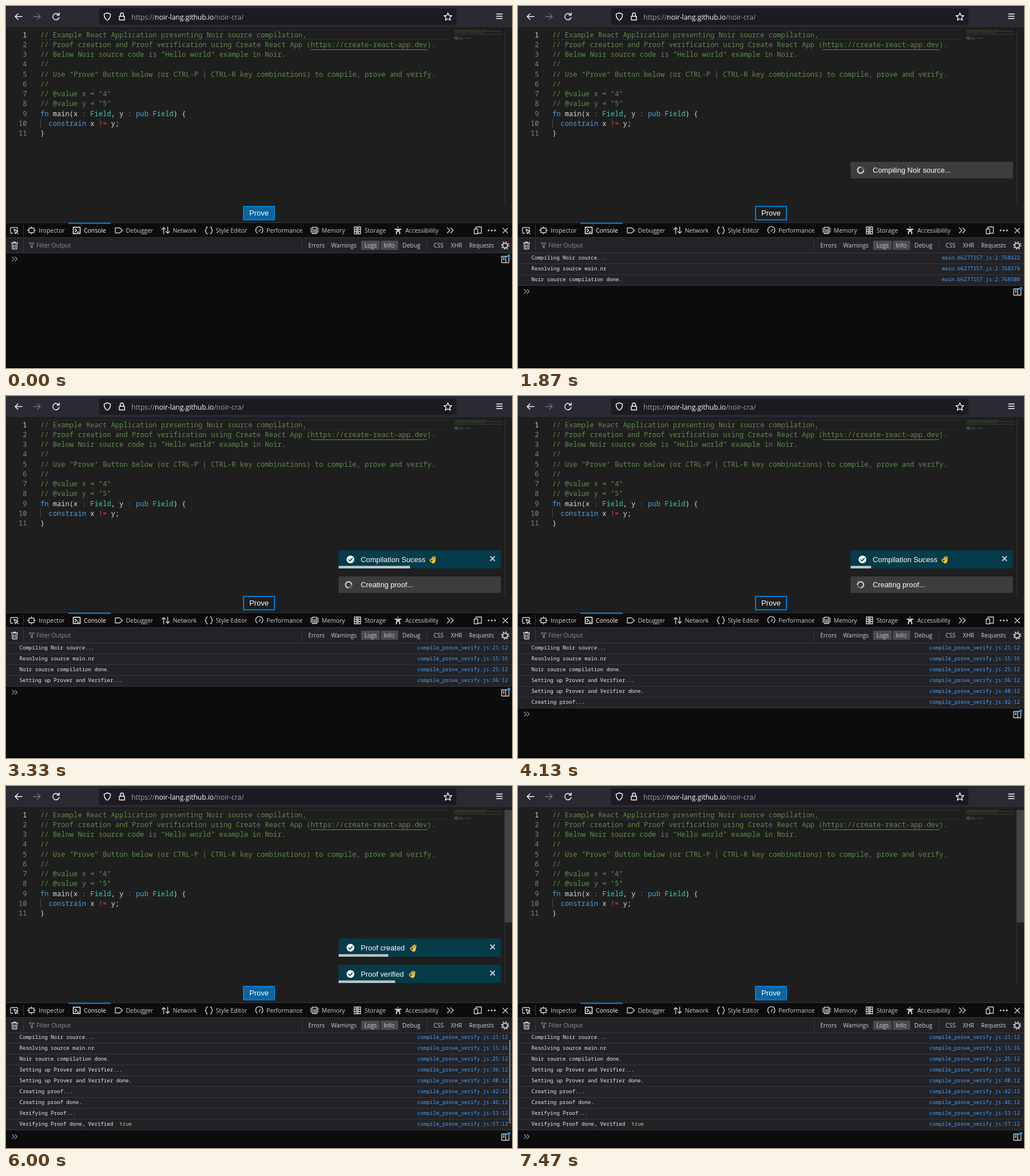
An HTML page for the animation above (8 s loop, 884 px wide and 634 px high).

```html
<!DOCTYPE html>
<html lang="en">
<head>
<meta charset="utf-8">
<title>Noir proof demo</title>
<style>
  html, body { margin: 0; width: 100%; height: 100%; overflow: hidden; background: #0c0c0d; }
  svg { position: absolute; left: 0; top: 0; display: block; overflow: visible; }
  text { white-space: pre; }
  .ui { font: 10.4px "Open Sans", sans-serif; fill: #d7d7db; }
  .mono { font-family: "Noto Sans Mono", monospace; font-weight: 500; }
  .log { font-size: 9.1px; fill: #ececee; }
  .arial { font: 13px "Liberation Sans", Arial, sans-serif; fill: #fff; }
  .line { fill: none; stroke: #d0d0d4; stroke-width: 1.4; stroke-linecap: round; stroke-linejoin: round; }
  .toast { position: absolute; left: 580.5px; width: 283.5px; height: 32px; }
  .toast .arial { font-size: 12.8px; }
</style>
</head>
<body>
<svg id="stage" width="884" height="634">
  <!-- browser bar -->
  <path fill="#2b2a33" d="M0 0h884v37H0z"/>
  <rect x="162.500" y="4" width="624.500" height="29" rx="4" fill="#1c1b22"/>
  <g class="line" style="stroke:#fbfbfe">
    <path d="M28 18.500H16m5-5-5 5 5 5"/>
    <path stroke-opacity=".35" d="M48 18.500h12m-5-5 5 5-5 5"/>
    <path d="M92 15.500a5.600 5.600 0 1 0 .8 4.500M93 12v4h-4"/>
    <path d="M177 12l5.500 2.200c.3 5-1.500 8.500-5.500 10.800-4-2.300-5.800-5.800-5.500-10.800z"/>
    <path d="M198 18h9v6.500h-9zM199.800 18v-3a2.700 2.700 0 0 1 5.400 0v3"/>
    <path d="M772 12l2 4.500 4.800.5-3.600 3.200 1.100 4.800-4.300-2.500-4.300 2.500 1.100-4.800-3.600-3.200 4.800-.5z"/>
    <path d="M857 14h10m-10 4h10m-10 4h10"/>
  </g>
  <text x="219" y="23.500" font-family="Open Sans, sans-serif" font-size="12.050" fill="#a09fa8">https://<tspan fill="#fbfbfe">noir-lang.github.io</tspan>/noir-cra/</text>

  <!-- editor -->
  <path fill="#1e1e1e" d="M0 37h884v342H0z"/>
  <path fill="none" stroke="#292929" stroke-width="1.500" d="M60 42.500h714M60 58.500h714"/>
  <path stroke="#333" d="M871.500 42v307"/>
  <path stroke="#4a4a4a" d="M60.500 197v17"/>
  <path stroke="#608b4e" d="M532 76.500h204"/>
  <g id="code" class="mono"></g>
  <rect id="editorScroll" x="871" y="42" width="13" height="197" fill="#434343"/>
  <rect id="button" x="415" y="351" width="54" height="23.500" fill="#0e639c" stroke="#007fd4" stroke-width="2"/>
  <text class="arial" x="442" y="367" text-anchor="middle">Prove</text>

  <!-- developer tools -->
  <path fill="#0c0c0d" d="M0 379h884v255H0z"/>
  <path fill="#232327" d="M0 406h884v26H0z"/>
  <path stroke="#38383d" d="M0 379.500h884M0 405.500h884M0 432.500h884M30.500 383v19M30.500 410v18M517.500 410v18M735.500 410v18"/>
  <path fill="#0a84d8" d="M109 379.500h74v2h-74z"/>
  <path fill="#4a4a4f" d="M620.500 411h32.500v16h-32.500zM655 411h30v16h-30z"/>
  <rect id="hover" x="523" y="411" width="38" height="15" fill="#fff" fill-opacity=".1"/>
  <g class="line">
    <path d="M12 398H9q-1 0-1-1v-8q0-1 1-1h10q1 0 1 1v3m-6-1 2.500 8 1.500-3 3-1.500zM18 396l3 3"/>
    <path d="M40 389h9v8h-9zM44.500 386.500v2.500m0 8v2.500M37.500 393H40m9 0h2.500"/>
    <path stroke="#fff" d="M117.500 387.500h12v11h-12zM120.500 390.500l3 2.500-3 2.500m4 .5h2.500"/>
    <path d="M191 388.500h7.500l5 4.500-5 4.500H191z"/>
    <path d="M275.500 399v-11m-3 3 3-3 3 3M282.500 387v11m-3-3 3 3 3-3"/>
    <path d="M352 387c-4 0-1 5-4 6 3 1 0 6 4 6m5-12c4 0 1 5 4 6-3 1 0 6-4 6"/>
    <path d="M438.500 397.500a6.300 6.300 0 1 1 8 0M442 395l2.500-4"/>
    <path d="M535 387.500h8v11h-8zM538 391v6m2.500-6v6M532 389.500h1.500m-1.500 3h1.500m-1.500 3h1.500m11-6h1.500m-1.500 3h1.500m-1.500 3h1.500"/>
    <path d="M608.500 387h11v12h-11zm0 4h11m-11 4h11M612 389h4m-4 4h4m-4 4h4"/>
    <path stroke-width="2" d="M680 391h10m-5 0v4m-2-3-1 7m5-7 1 7M685 387.500v.1"/>
    <path d="M771 388.500l4.500 4.500-4.500 4.500m6-9 4.500 4.500-4.500 4.500"/>
    <path d="M821 390v-3h9.500v11h-6M818 390.500h6v8.500h-6z"/>
    <path stroke-width="3" d="M843 393h.1m5.400 0h.1m5.400 0h.1"/>
    <path d="M868 389l8.500 8.500m0-8.500-8.500 8.500"/>
    <path d="M9.500 415h11m-7.500 0v-1.500h4v1.500m-6.500 0 .7 10.500h7.600l.7-10.500M13.500 418v5m3-5v5"/>
    <path stroke="#939395" stroke-width="1.100" d="M40.500 415h8.500l-3 4v5l-2-1.500v-3.500z"/>
    <circle cx="872" cy="419.500" r="4.200" stroke-width="2"/>
    <circle cx="872" cy="419.500" r="6.300" stroke-width="2" stroke-dasharray="2 2.950" stroke-linecap="butt"/>
  </g>
  <g id="labels" class="ui"></g>

  <clipPath id="outputClip"><path d="M0 433h884v170H0z"/></clipPath>
  <g clip-path="url(#outputClip)"><g id="rows" class="mono log"></g></g>
  <rect id="logScroll" x="879" y="445" width="2.500" height="146" fill="#77777c"/>
  <g id="prompt" class="line">
    <path stroke="#8f8f93" d="M11 439.500l3.500 3.500-3.500 3.500m5-7 3.500 3.500-3.500 3.500"/>
    <path d="M866 438.500h12.500v11H866zM873 438.500v11M868.500 441.500h2m-2 2.500h2"/>
    <circle cx="878.500" cy="437.500" r="2.700" fill="#0090ed" stroke="none"/>
  </g>
  <path fill="#000" d="M0 632h884v2H0z"/>
</svg>

<script>
const LOOP = 8000;
const $ = id => document.getElementById(id);
const clamp = v => Math.max(0, Math.min(1, v));

// Interpolates between [position, value] points; power > 1 eases in.
function track(points, p, power = 1) {
  if (p <= points[0][0]) return points[0][1];
  for (let i = 1; i < points.length; i++) {
    const [a, from] = points[i - 1], [b, to] = points[i];
    if (p < b) return from + (to - from) * ((p - a) / (b - a)) ** power;
  }
  return points.at(-1)[1];
}

// Editor source: {color:text} markup, plain text in the default colour.
const COLORS = { c: '#608b4e', k: '#569cd6', t: '#3dc9b0', r: '#d9464a' };
const source = [
  '{c:// Example React Application presenting Noir source compilation,}',
  '{c:// Proof creation and Proof verification using Create React App (https://create-react-app.dev).}',
  '{c:// Below Noir source code is "Hello world" example in Noir.}',
  '{c://}',
  '{c:// Use "Prove" Button below (or CTRL-P | CTRL-R key combinations) to compile, prove and verify.}',
  '{c://}',
  '{c:// @value x = "4"}',
  '{c:// @value y = "5"}',
  '{k:fn} main(x {r::} {t:Field}, y {r::} {k:pub} {t:Field}) {',
  '  {k:constrain} x {r:!=} y;',
  '}'
];
const paint = s => s.replace(/\{([cktr]):(.*?)\}/g, (_, c, text) => `<tspan fill="${COLORS[c]}">${text}</tspan>`);
const codeLines = (x, y, size, pitch) => source.map((s, i) =>
  `<text x="${x}" y="${y + i * pitch}" font-size="${size}" fill="#dcdcdc">${paint(s)}</text>`).join('');
$('code').innerHTML = codeLines(60, 54.5, 12.11, 17.27) +
  `<g font-weight="700">${codeLines(782, 43, 1.51, 1.8)}</g>` +
  source.map((_, i) => `<text x="36.500" y="${54.5 + i * 17.27}" font-size="12.110" text-anchor="end" fill="${i ? '#858585' : '#d8dee6'}">${i + 1}</text>`).join('');

const tabs = { Inspector: 57, Console: 136, Debugger: 209.5, Network: 291.5, 'Style Editor': 366.5,
  Performance: 455, Memory: 551.5, Storage: 626.5, Accessibility: 697.5 };
const filters = { 'Filter Output': 53, Errors: 528, Warnings: 568, Logs: 626, Info: 660, Debug: 692.5,
  CSS: 747, XHR: 777, Requests: 809 };
const labels = (set, y, size) => Object.entries(set).map(([name, x]) => {
  const fill = name === 'Console' ? '#fff' : name === 'Filter Output' ? '#939395' : '#d0d0d4';
  return `<text x="${x}" y="${y}" font-size="${size}" fill="${fill}">${name}</text>`;
}).join('');
$('labels').innerHTML = labels(tabs, 397, 10.4) + labels(filters, 422.8, 10.2);

// Console: [time, message, position in source, position in bundle]
const logs = [
  [1600, 'Compiling Noir source...', '21:12', 768422],
  [1670, 'Resolving source main.nr', '15:16', 768374],
  [1800, 'Noir source compilation done.', '25:12', 768508],
  [2000, 'Setting up Prover and Verifier...', '36:12', 768621],
  [3670, 'Setting up Prover and Verifier done.', '40:12'],
  [3670, 'Creating proof...', '42:12'],
  [4250, 'Creating proof done.', '46:12'],
  [4250, 'Verifying Proof...', '53:12'],
  [4350, 'Verifying Proof done, Verified  <tspan fill="#86de74">true</tspan>', '57:12']
];
const MAPPED_AT = 2000;
$('rows').innerHTML = logs.map(([, message], i) => `<g transform="translate(0 ${432 + i * 19})">
  <path fill="#232327" d="M0 0h884v19H0z"/><path stroke="#38383d" d="M0 .5h884M0 19.500h884"/>
  <text x="23.500" y="12">${message}</text>
  <text class="place" x="877" y="12" text-anchor="end" fill="#45a1ff"></text></g>`).join('');
const rows = [...$('rows').children];
const places = rows.map(row => row.querySelector('.place'));

// Toasts, oldest on top of the stack
const FLIP_OUT = 600;
const toasts = [
  { enter: 1530, flip: 430, done: 1935, out: 4450, pending: 'Compiling Noir source...', text: 'Compilation Sucess', hand: 158.5,
    bar: [[2380, 283.5], [3330, 125], [4130, 36], [4450, 0]] },
  { enter: 1870, flip: 460, done: 4252, out: 6775, pending: 'Creating proof...', text: 'Proof created', hand: 124.5,
    bar: [[4252, 283.5], [6775, 0]] },
  { enter: 4250, flip: 350, done: 4348, out: 6850, pending: 'Verifying proof...', text: 'Proof verified', hand: 122.5,
    bar: [[4348, 283.5], [6883, 0]] }
];
for (const toast of toasts) {
  const el = toast.el = document.createElement('div');
  el.className = 'toast';
  el.innerHTML = `<svg width="283.500" height="32">
    <g class="pending">
      <path fill="#3d3d3d" d="M0 0h283.500v29H0z"/>
      <text class="arial" x="38.800" y="19">${toast.pending}</text>
      <g fill="none" stroke-width="2"><circle cx="17.500" cy="14.500" r="5.300" stroke="#e0e0e0"/>
      <path class="spin" stroke="#616161" d="M21.250 10.750a5.300 5.300 0 0 1 0 7.500"/></g>
    </g>
    <g class="done">
      <path fill="#063b49" d="M0 0h283.500v32H0z"/>
      <circle cx="20.800" cy="16.300" r="6.700" fill="#fff"/>
      <path class="line" style="stroke:#063b49;stroke-width:1.700" d="M17.700 16.500l2.300 2.300 4-4.600"/>
      <text class="arial" x="38.800" y="21">${toast.text}</text>
      <g transform="translate(${toast.hand} 10)" fill="none" stroke="#fdc033" stroke-linecap="round">
        <path stroke-width="1.800" d="M5.800 5.500L5.500 2.200M7.900 6L8.200 1.200M9.800 7L10.600 2.500"/>
        <path fill="#fdc033" stroke-width="1" d="M7 6.500l3.300.5-.5 4-2.300 2-3.500-1.200 2.500-1.500z"/>
        <circle cx="4" cy="7.800" r="2.400" stroke-width="1.600"/>
      </g>
      <path class="line" style="stroke:#c3ced2;stroke-width:2;stroke-linecap:butt" d="M265 10.800l8 8m0-8-8 8"/>
      <rect class="bar" y="27.500" height="4.500" fill="#b7c5ca"/>
    </g></svg>`;
  for (const part of ['pending', 'done', 'spin', 'bar']) toast[part + 'El'] = el.querySelector('.' + part);
  document.body.append(el);
}

const show = (el, visible) => { el.style.display = visible ? '' : 'none'; };

function drawToasts(t) {
  let bottom = 345;
  for (const toast of [...toasts].reverse()) {
    const { el, enter, flip, done, out } = toast;
    const visible = t >= enter && t < out + FLIP_OUT;
    show(el, visible);
    if (!visible) continue;
    const finished = t >= done, height = finished ? 32 : 29;
    const inP = (t - enter) / flip, outP = (t - out) / FLIP_OUT;
    const angle = outP > 0 ? track([[0, 0], [.3, -20], [1, 90]], outP)
      : track([[0, 90], [.4, -20], [.6, 10], [.8, -5], [1, 0]], inP, 1.7);
    el.style.top = bottom - height + 'px';
    el.style.height = height + 'px';
    el.style.opacity = outP > 0 ? track([[.3, 1], [1, 0]], outP) : track([[0, 0], [.6, 1]], inP);
    el.style.transform = angle ? `perspective(400px) rotateX(${angle}deg)` : 'none';
    show(toast.pendingEl, !finished);
    show(toast.doneEl, finished);
    toast.spinEl.setAttribute('transform', `rotate(${t / 650 * 360} 17.5 14.5)`);
    toast.barEl.setAttribute('width', track(toast.bar, t));
    bottom -= height + 14;
  }
}

function drawConsole(t) {
  const count = logs.filter(([time]) => t >= time).length;
  rows.forEach((row, i) => {
    show(row, i < count);
    const [, , position, bundled] = logs[i];
    places[i].textContent = t < MAPPED_AT ? `main.b6277157.js:2:${bundled}` : `compile_prove_verify.js:${position}`;
  });
  const full = count === logs.length;
  $('rows').setAttribute('transform', `translate(0 ${full ? -1 : 0})`);
  $('prompt').setAttribute('transform', `translate(0 ${count * 19})`);
  $('logScroll').setAttribute('opacity', full ? 1 - clamp((t - 6800) / 300) : 0);
}

function draw(now) {
  const t = now % LOOP;
  drawConsole(t);
  drawToasts(t);
  $('button').setAttribute('fill-opacity', track([[500, 1], [720, 0], [5400, 0], [5600, 1]], t));
  $('editorScroll').setAttribute('opacity', clamp((t - 5450) / 100));
  show($('hover'), t >= 470 && t < 600);
}

const start = performance.now();
function tick() {
  draw(performance.now() - start);
  requestAnimationFrame(tick);
}
tick();
</script>
</body>
</html>
```
